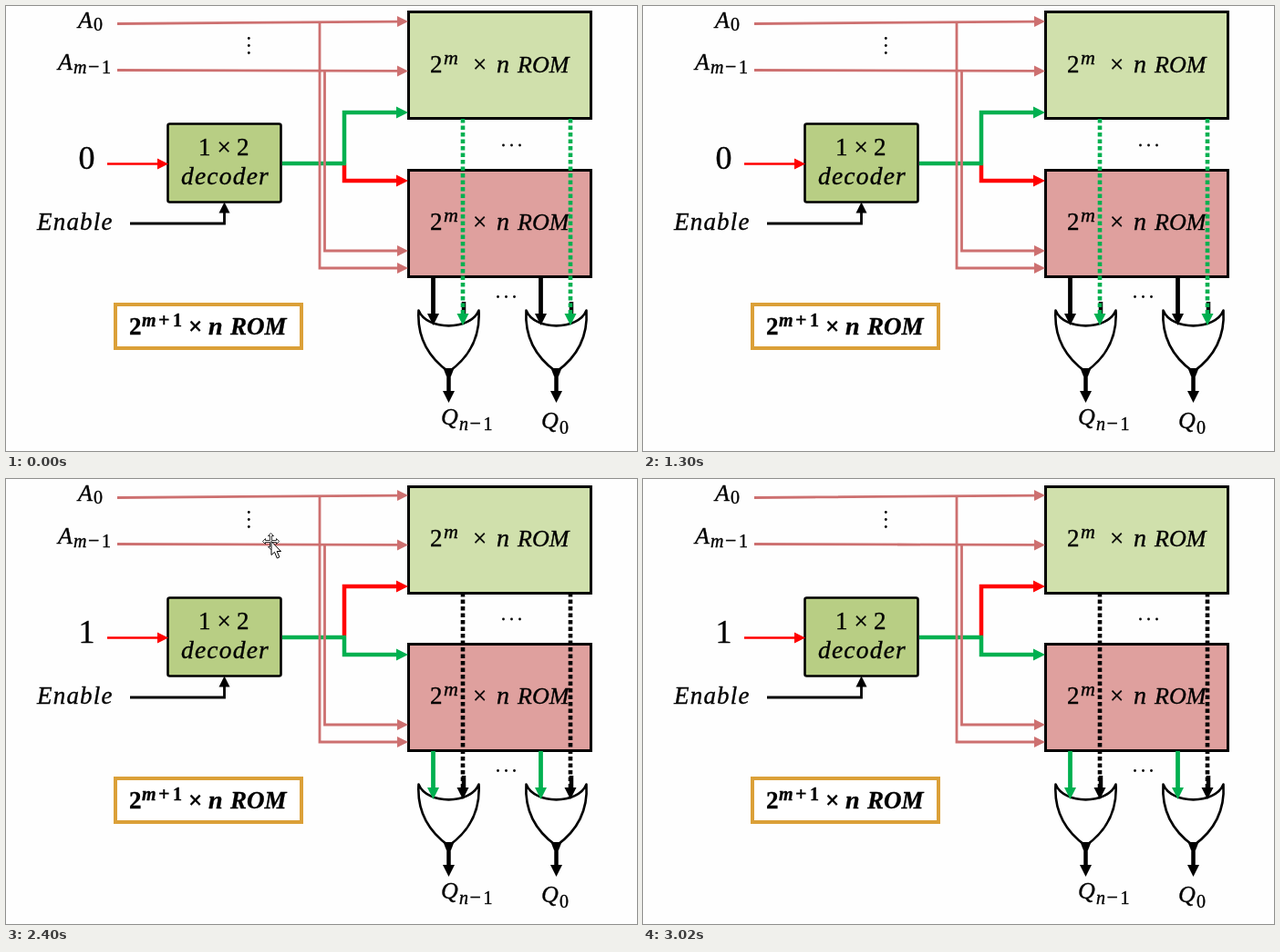
These frames come from a looping animation (692 by 489 pixels, 3300 ms). An HTML page:

```html
<!DOCTYPE html>
<html lang="en">
<head>
<meta charset="utf-8">
<title>ROM expansion with a decoder</title>
<style>
html, body { margin: 0; width: 100%; height: 100%; overflow: hidden; background: #fefefe; }
svg { display: block; width: 692px; height: 489px; --upper: #00b050; --lower: #f00; --dash: #00b050; --solid: #000; }
svg.one { --upper: #f00; --lower: #00b050; --dash: #000; --solid: #00b050; }
.one #shift { transform: translateY(1px); }
.one #top { transform: translateY(1px); }
text { font: italic 27px "Liberation Serif", "Times New Roman", serif; white-space: pre; stroke: #000; stroke-width: .35px; }
.up { font-style: normal; }
.bold text { font-weight: bold; }
.wide { letter-spacing: 1.2px; }
.box { stroke: #000; stroke-width: 3; }
</style>
</head>
<body>
<svg id="stage" viewBox="0 0 692 489">
  <g id="shift">
    <rect id="top" class="box" x="441.5" y="6.5" width="200" height="117" fill="#d0e0ac"/>
    <rect class="box" x="441.5" y="180.5" width="200" height="117" fill="#dfa09e"/>
    <rect class="box" x="177.5" y="129.5" width="124" height="86" rx="2" fill="#b8ce84" style="stroke-width:2.6"/>
    <rect x="120" y="328" width="204" height="48" fill="#fff" stroke="#dba038" stroke-width="4"/>
    <g id="labels"></g>
    <g id="bold" class="bold"></g>
    <g id="wires"></g>
  </g>
  <g id="fixed"></g>
  <g id="cursor" fill="#fff" stroke="#000">
    <path d="M0-9l3 3H1V-1H6V-3L9 0 6 3V1H1V6H3L0 9-3 6H-1V1H-6V3L-9 0-6-3V-1H-1V-6H-3Z" stroke-width=".8"/>
    <path d="M.5 0V15L4 11.8 6.8 18.500 9.4 17.300 6.700 11H11Z"/>
  </g>
</svg>
<script>
const $ = id => document.getElementById(id);
const wires = $('wires'), labels = $('labels'), bold = $('bold'), fixed = $('fixed');

function add(parent, tag, attrs, content = '') {
  const el = document.createElementNS('http://www.w3.org/2000/svg', tag);
  for (const key in attrs) el.setAttribute(key, attrs[key]);
  el.textContent = content;
  parent.append(el);
}

function label(parent, x, y, content, size = 27, cls = '') {
  add(parent, 'text', { x, y, class: cls, style: `font-size:${size}px` }, content);
}

function line(points, color, width, dash = 'none') {
  add(wires, 'polyline', { points: points.join(' '), fill: 'none',
    style: `stroke:${color};stroke-width:${width};stroke-dasharray:${dash}` });
}

// Polyline whose last point is the tip of a triangular head.
function arrow(points, color, width, size = 12, dash) {
  const [x, y] = points.at(-1), [px, py] = points.at(-2);
  const len = Math.hypot(x - px, y - py), dx = (x - px) / len, dy = (y - py) / len;
  const bx = x - dx * size, by = y - dy * size, h = size / 2;
  line([...points.slice(0, -1), [bx + dx, by + dy]], color, width, dash);
  add(wires, 'polygon', { style: `fill:${color}`,
    points: `${x},${y} ${bx - dy * h},${by + dx * h} ${bx + dy * h},${by - dx * h}` });
}

function dots(x, y, dx, dy, r) {
  for (const i of [-1, 0, 1]) add(labels, 'circle', { cx: x + i * dx, cy: y + i * dy, r });
}

// Labels
label(fixed, 79, 23.5, 'A', 26);
label(fixed, 96, 26.5, '0', 20, 'up');
label(labels, 57, 70, 'A', 26);
label(labels, 74, 73.5, 'm', 20);
label(labels, 90, 73.5, '−', 22, 'up');
label(labels, 105, 73.5, '1', 20, 'up');
label(labels, 34, 246, 'Enable', 27, 'wide');
label(labels, 211, 164, '1', 27, 'up');
label(labels, 231.5, 164, '×', 27, 'up');
label(labels, 253, 164, '2', 27, 'up');
label(labels, 192, 196, 'decoder', 27.5, 'wide');
for (const y of [73, 246]) {
  label(labels, 465, y, '2', 27, 'up');
  label(labels, 480, y - 9, 'm', 22);
  label(labels, 512, y, '×', 27, 'up');
  label(labels, 538, y, 'n', 28);
  label(labels, 561, y, 'ROM', 26);
}
label(bold, 135, 361, '2', 27, 'up');
label(bold, 149, 352, 'm', 20);
label(bold, 167, 352, '+', 22, 'up');
label(bold, 183, 352, '1', 20, 'up');
label(bold, 200, 361, '×', 27, 'up');
label(bold, 222, 361, 'n', 28);
label(bold, 246, 361, 'ROM');
label(labels, 477, 459.5, 'Q', 26);
label(labels, 497, 465.5, 'n', 20);
label(labels, 508.5, 465.5, '−', 22, 'up');
label(labels, 523.5, 465.5, '1', 20, 'up');
label(labels, 587, 464, 'Q', 26);
label(labels, 607, 470, '0', 20, 'up');
add(labels, 'text', { id: 'bit', x: 79.5, y: 179, class: 'up', style: 'font-size:36px' });
dots(266.3, 43.5, 0, 8, 1.4);
dots(554.5, 153, 9, 0, 1.4);
dots(548.5, 319.5, 9, 0, 1.4);

// Inputs and decoder outputs
const pink = '#cd7070', green = '#00b050';
arrow([[371, 173], [371, 192], [441, 192]], 'var(--lower)', 4.5, 13);
arrow([[371, 173], [371, 117], [441, 117]], 'var(--upper)', 4.5, 13);
line([[303, 173], [373, 173]], green, 4.5);
arrow([[122, 19.5], [441, 17]], pink, 2.8);
arrow([[122, 70.5], [441, 71.5]], pink, 2.8);
arrow([[344, 19], [344, 288], [441, 288]], pink, 2.8);
arrow([[349.5, 71], [349.5, 269], [441, 269]], pink, 2.8);
arrow([[111, 173.5], [178, 173.5]], '#f00', 2.6);
arrow([[136, 239], [239.5, 239], [239.5, 215.5]], '#000', 2.8);

// Output gates
for (const x of [485.5, 603.5]) {
  add(wires, 'path', { fill: '#fff', stroke: '#000', 'stroke-width': 2.6, 'stroke-linejoin': 'round',
    d: `M${x - 33} 334.5C${x - 24} 357 ${x + 24} 357 ${x + 33} 334.5C${x + 35} 366 ${x + 21} 387 ${x} 402C${x - 21} 387 ${x - 35} 366 ${x - 33} 334.5Z` });
  add(wires, 'path', { d: `M${x - 6} 398h12l-3.5 9h-5z` });
  arrow([[x, 402], [x, 436]], '#000', 4.5, 13);
  arrow([[x - 17, 298], [x - 17, 351]], 'var(--solid)', 4.8, 13);
  line([[x + 16.5, 325], [x + 16.5, 341]], '#000', 4.5);
  arrow([[x + 15.5, 124], [x + 15.5, 351]], 'var(--dash)', 4.6, 13, '4.6 2.9');
}

function draw(now) {
  const t = now % 3300;
  const one = t >= 1900 || (t >= 700 && t < 1300);
  $('stage').setAttribute('class', one ? 'one' : '');
  $('bit').textContent = one ? '1' : '0';
  const pos = t < 2500 ? '290.5 68.5' : '200.5 24.5';
  $('cursor').setAttribute('transform', `translate(${pos})`);
  $('cursor').style.display = t >= 2400 && t < 2600 ? '' : 'none';
}

const start = performance.now();
function tick() {
  draw(performance.now() - start);
  requestAnimationFrame(tick);
}
tick();
</script>
</body>
</html>
```
